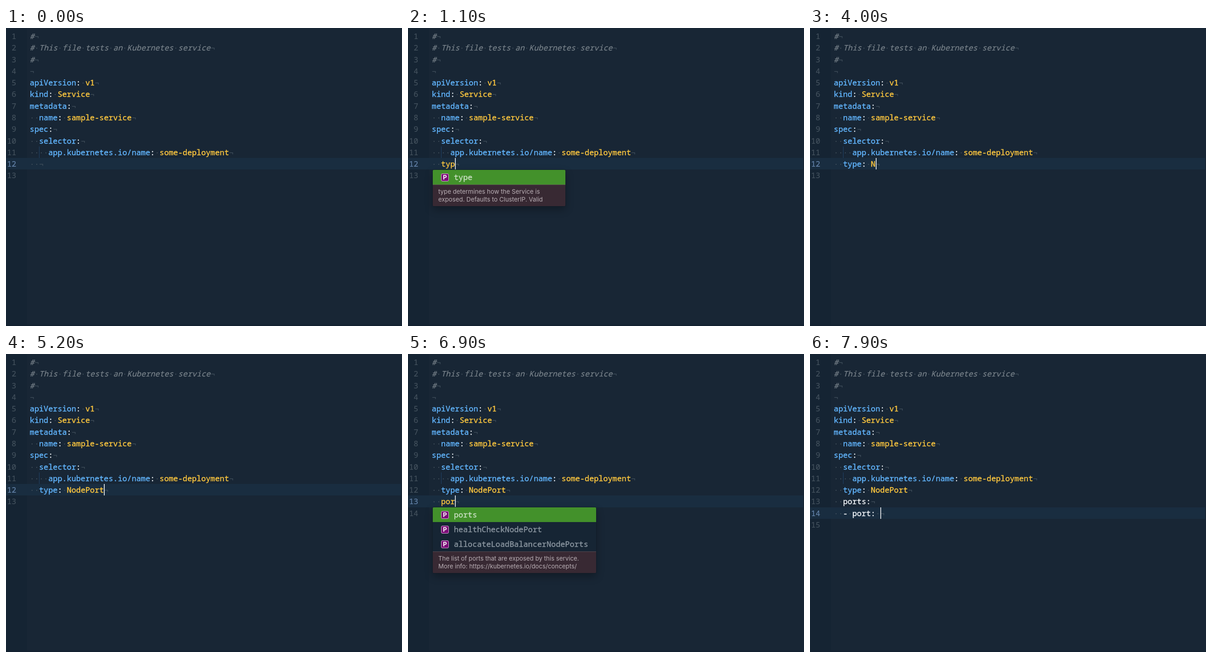
Animation of 863 by 649 pixels, one loop 8 s. Source, as an HTML page:

```html
<!DOCTYPE html>
<html lang="en">
<head>
<meta charset="utf-8">
<style>
  html, body { margin: 0; width: 100%; height: 100%; overflow: hidden; background: #182635; }
  #stage {
    position: relative; width: 863px; height: 649px; overflow: hidden;
    background: linear-gradient(90deg, #152433 46px, #182635 46px);
    font: 500 16.83px "Noto Sans Mono", "DejaVu Sans Mono", monospace;
    font-variant-ligatures: none; color: #f2f6fa; -webkit-text-stroke: .4px;
  }
  #stage::after { content: ""; position: absolute; left: 0; right: 0; bottom: 0; height: 3px; background: #132130; }
  .line { position: absolute; left: 0; width: 861px; height: 25.27px; line-height: 25.27px; white-space: pre; }
  .active { background: #192d40; }
  .num { position: absolute; right: 838.6px; font-weight: 400; color: #45535f; -webkit-text-stroke: .15px; }
  .active .num { color: #6787ae; }
  .code { position: absolute; left: 51.8px; }
  .key { color: #62b6ff; }
  .value { color: #ffc83f; }
  .comment { color: #78828a; font-style: italic; font-weight: 400; -webkit-text-stroke: .2px; }
  .mark { color: #44525e; font-style: normal; font-weight: 400; -webkit-text-stroke: 0; }
  .guide { position: absolute; left: 72px; top: 0; width: 1px; height: 100%; background: #204468; }
  .cursor {
    position: absolute; top: 0; width: 2px; height: 25px;
    background: linear-gradient(90deg, #fff8 1px, #fff 1px);
  }
  .popup {
    position: absolute; left: 54px; border-radius: 2px; overflow: hidden; background: #162534;
    box-shadow: 0 0 0 .5px #0d1822, 0 7px 18px rgba(0, 0, 0, .3);
  }
  .item { position: relative; height: 32px; line-height: 32px; padding-left: 46px; color: #8b96a0; }
  .item:first-child { background: #43912b; color: #c9dfc2; }
  .badge {
    position: absolute; left: 18px; top: 8px; box-sizing: border-box; width: 17px; height: 17px;
    border: 1px solid #dca9d9; border-radius: 3px; background: #7c0b78; color: #fff;
    font: bold 13px/15px Inter, sans-serif; text-align: center; -webkit-text-stroke: 0;
  }
  .doc {
    box-sizing: border-box; height: 47px; padding: 6px 12px 0; border-top: 1px solid #57484f;
    background: #382933; color: #b9afb5; white-space: pre;
    font: 400 13.3px/17px Inter, sans-serif; -webkit-text-stroke: 0;
  }
</style>
</head>
<body>
<div id="stage"></div>
<script>
const LOOP = 8000, BLINK = 500, LINE = 25.27, TOP = 5.1, LEFT = 51.8, CHAR = 10.1;
const stage = document.getElementById("stage");

const header = `#
# This file tests an Kubernetes service
#

apiVersion: v1
kind: Service
metadata:
  name: sample-service
spec:
  selector:
    app.kubernetes.io/name: some-deployment`.split("\n");

const typePopup = {
  width: 289, items: ["type"],
  doc: "type determines how the Service is\nexposed. Defaults to ClusterIP. Valid"
};
const portsPopup = {
  width: 356, items: ["ports", "healthCheckNodePort", "allocateLoadBalancerNodePorts"],
  doc: "The list of ports that are exposed by this service.\nMore info: https://kubernetes.io/docs/concepts/"
};
const widePopup = {
  ...portsPopup,
  items: [...portsPopup.items, "ipFamilyPolicy", "externalTrafficPolicy", "internalTrafficPolicy"]
};

// Each edit: time, text after the header, popup. "!" marks a line not yet highlighted.
const nodePort = "  type: NodePort\n";
const edits = [
  [-500, "  "],
  [800, "  t"],
  [1000, "  ty", typePopup],
  [1100, "  typ", typePopup],
  [3100, "!  type: "],
  ...[4000, 4100, 4200, 4400, 4700, 4900, 5000, 5200].map((time, i) =>
    [time, "  type: " + "NodePort".slice(0, i + 1)]),
  [5700, nodePort + "  "],
  [5800, nodePort + "  "],
  [6500, nodePort + "  p"],
  [6700, nodePort + "  po", widePopup],
  [6900, nodePort + "  por", portsPopup],
  [7800, nodePort + "!  ports:\n!  - port: "]
];

const span = (name, text) => `<span class="${name}">${text}</span>`;
const dots = text => text.replace(/ +/g, spaces => span("mark", "·".repeat(spaces.length)));

function highlight(text) {
  if (text[0] === "!") return dots(text.slice(1));
  if (text[0] === "#") return span("comment", dots(text));
  const [, indent, key, colon, value] = text.match(/^( *)(?:([\w.\/]+)(: ?))?(.*)$/);
  return dots(indent) + (key ? span("key", key) + dots(colon) : "") + span("value", dots(value));
}

function lineHtml(text, i, active, last, cursor) {
  const code = last ? "" : highlight(text) + span("mark", "¬");
  return `<div class="line${active ? " active" : ""}" style="top:${TOP + i * LINE}px">` +
    span("num", i + 1) + span("code", code) +
    (/^ {4}/.test(text) ? span("guide", "") : "") +
    (cursor ? `<i class="cursor" style="left:${Math.floor(LEFT + .3 + text.replace("!", "").length * CHAR)}px"></i>` : "") +
    "</div>";
}

function popupHtml({ width, items, doc }, row) {
  const rows = items.map(name => `<div class="item">${span("badge", "P")}${name}</div>`).join("");
  return `<div class="popup" style="width:${width}px;top:${Math.round(TOP + row * LINE + .4)}px">` +
    `${rows}<div class="doc">${doc}</div></div>`;
}

let shown = "";
function draw(t) {
  const [time, text, popup] = edits.filter(edit => edit[0] <= t).pop();
  const cursorOn = Math.floor((t - time) / BLINK) % 2 === 0;
  const state = time + "/" + cursorOn;
  if (state === shown) return;
  shown = state;
  const lines = [...header, ...text.split("\n"), ""];
  const current = lines.length - 2;
  stage.innerHTML = lines.map((line, i) =>
    lineHtml(line, i, i === current, i > current, i === current && cursorOn)).join("") +
    (popup ? popupHtml(popup, current + 1) : "");
}

const start = performance.now();
function tick() {
  draw((performance.now() - start) % LOOP);
  requestAnimationFrame(tick);
}
tick();
</script>
</body>
</html>
```
